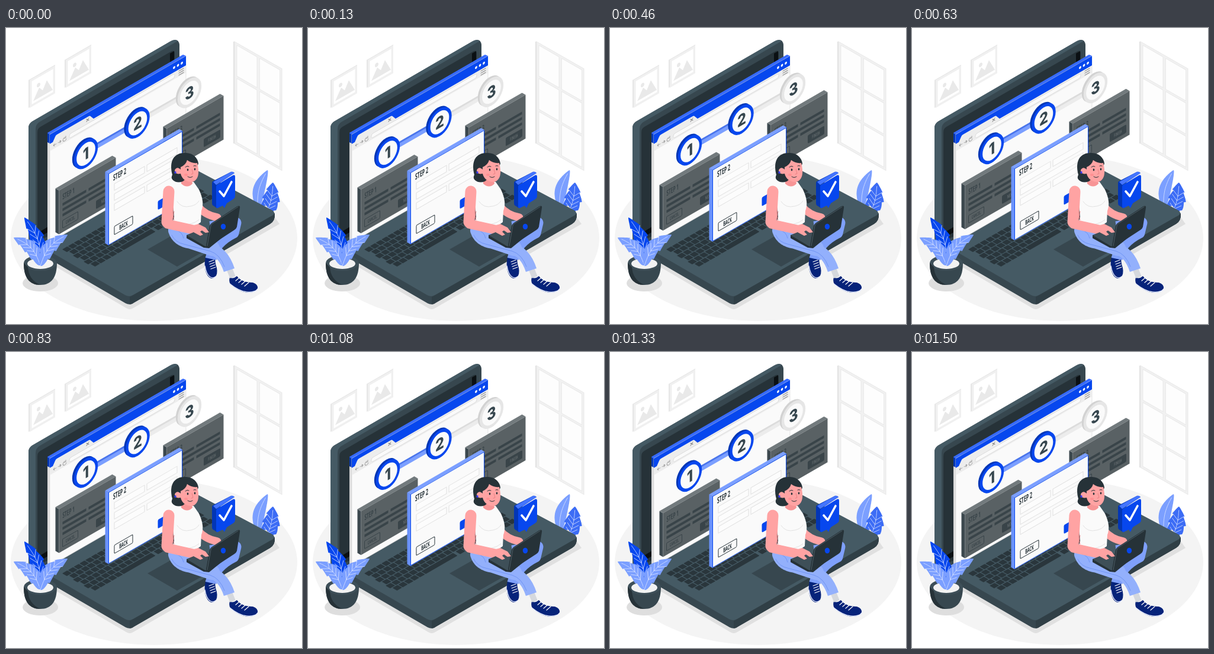
Animation of 500 by 500 pixels, one loop 1.54 s. Source, as an HTML page:

```html
<!DOCTYPE html>
<html lang="en">
<head>
<meta charset="utf-8">
<title>Step form</title>
<style>
html, body { margin: 0; width: 100%; height: 100%; overflow: hidden; background: #fff; }
svg { display: block; width: 100vw; height: 100vh; }
text { font-family: "Open Sans", sans-serif; font-weight: 700; }
.digit { font: 800 27px Inter, sans-serif; text-anchor: middle; fill: #37474f; }
</style>
</head>
<body>
<svg id="stage" viewBox="0 0 500 500"></svg>
<script>
const BLUE = '#0747ee', DEEP = '#0336b5', LIGHT = '#7b9fff', NAVY = '#06237a';
const INK = '#263238', SLATE = '#37474f', DECK = '#455a64', SKIN = '#ffa3a3', PAPER = '#fafafa';
const SLOPE = .577;

const path = (d, fill) => `<path d="${d}" fill="${fill}"/>`;
const line = (d, stroke, width = 1, cap = 'round') =>
  `<path d="${d}" fill="none" stroke="${stroke}" stroke-width="${width}" stroke-linecap="${cap}" stroke-linejoin="round"/>`;
const rect = (x, y, w, h, fill, extra = '') =>
  `<rect x="${x}" y="${y}" width="${w}" height="${h}" fill="${fill}" ${extra}/>`;
const oval = (x, y, rx, ry, fill) => `<ellipse cx="${x}" cy="${y}" rx="${rx}" ry="${ry}" fill="${fill}"/>`;
const repeat = (n, draw) => Array.from({ length: n }, (_, i) => draw(i)).join('');

// Vertical isometric plane; a positive slope rises to the right
const wall = (x, y, content, slope = SLOPE) => `<g transform="matrix(1 ${-slope} 0 1 ${x} ${y})">${content}</g>`;
const label = (x, y, size, fill, text, anchor = 'start') =>
  `<text transform="translate(${x} ${y}) scale(.5 1)" font-size="${size}" fill="${fill}" text-anchor="${anchor}">${text}</text>`;
const button = (x, y, w, h, fill, ink, size, text) =>
  rect(x, y, w, h, fill, `rx="1.5" stroke="${fill === 'none' ? ink : fill}"`) +
  label(x + w / 2, y + h / 2 + size * .36, size, ink, text, 'middle');

function slab(x, y, w, h, depth, [front, side, top], content) {
  const rise = w * SLOPE, dy = depth * SLOPE;
  return path(`M${x} ${y}l${-depth} ${-dy}v${h}l${depth} ${dy}z`, side) +
    path(`M${x} ${y}l${-depth} ${-dy}l${w} ${-rise}l${depth} ${dy}z`, top) +
    wall(x, y, rect(0, 0, w, h, front) + content);
}

// Three form rows: split, full, split
function formRows(x, y, width, step, cell) {
  const half = width / 2 - 2;
  return repeat(3, i => i === 1 ? cell(x, y + step, width)
    : cell(x, y + i * step, half) + cell(x + half + 4, y + i * step, half));
}

function leaf(x0, y0, x1, y1, width, bend, fill, teeth) {
  const dx = x1 - x0, dy = y1 - y0, len = Math.hypot(dx, dy);
  const at = (t, side) => {
    const off = bend * Math.sin(Math.PI * t) + side;
    return `${(x0 + dx * t - dy / len * off).toFixed(1)} ${(y0 + dy * t + dx / len * off).toFixed(1)}`;
  };
  const half = t => width * Math.sin(Math.PI * t ** .9) ** .75 * (1 - (teeth ? .25 : 0) * (t * teeth % 1));
  const steps = Array.from({ length: 49 }, (_, i) => i / 48.01);
  const outline = [...steps.map(t => at(t, half(t))), ...steps.reverse().map(t => at(t, -half(t)))];
  const rib = steps.filter(t => t < .9).map(t => at(t, 0));
  const veins = repeat(teeth, i => {
    const t = .25 + i * .5 / teeth;
    return [-1, 1].map(s => `M${at(t, 0)}L${at(t + .14, s * width * .6)}`).join('');
  });
  return path('M' + outline.join('L') + 'z', fill) + line('M' + rib.join('L') + veins, '#dce5ff', .8);
}

function picture(x, y) {
  return wall(x - 2, y, rect(0, 0, 45, 47, '#e6e6e6')) + wall(x, y,
    rect(0, 0, 43, 47, '#f0f0f0') + rect(3.5, 4, 36, 39, '#fff') +
    path('M6 39L16 22l6 8 7 -13 10 22z', '#e9e9e9') + oval(15, 17, 3, 3.5, '#e9e9e9'));
}

function windowFrame() {
  const pane = i => rect(4 + i % 2 * 38.5, 4 + (i >> 1) * 56, 34, 52, '#fdfdfd', 'stroke="#e6e6e6" stroke-width=".8"');
  return rect(384, 23, 3, 172, '#e2e2e2') +
    wall(386, 23, rect(0, 0, 80, 172, '#f1f1f1', 'stroke="#e8e8e8"') + repeat(6, pane), -.572);
}

function keyboard() {
  const row = j => repeat(21, i => j === 5 && i > 4 && i < 11 ? ''
    : rect(i * 11.2 + j % 2 * 3, j * 10.4, 9.8, 9, '#2a363c', 'rx="1"'));
  return `<g transform="matrix(.866 -.5 .866 .5 95 374)">${repeat(6, row)}${rect(59, 52, 62, 9, '#2a363c', 'rx="1"')}</g>`;
}

function laptop() {
  return path('M58 388L203 473Q209 477 215 473L462 331 440 300z', '#e0e0e0') +
    path('M38 169Q38 162 44 158L277 23Q291 15 293 28V232L75 375 38 358z', SLATE) +
    path('M38 169Q38 162 44 158L277 23Q284 18 290 22L56 159Q50 163 50 171V362L38 358z', DECK) +
    path('M53 176Q53 170 58 167L280 39Q285 37 285 43V225L75 350 53 360z', INK) +
    path('M277 43l7 -4v17l-7 4zM54 346l18 -11v9l-18 11z', '#0b1013') +
    path('M66 372V386L202 465Q209 469 216 464L446 331Q455 326 454 313L300 240z', SLATE) +
    path('M70 375Q63 370 70 365L303 230 446 306Q460 312 446 319L215 451Q208 455 201 451z', DECK) +
    path('M209 454v13q4 0 7 -3L446 331q9 -5 8 -18 0 3 -8 6L215 451z', '#303f46') +
    keyboard() + path('M239 374l44 -25 50 29 -44 25z', SLATE);
}

function browser() {
  return path('M74 180l-4 -3v184l4 2z', '#dcdcdc') + path('M74 180l-4 -3v16l4 2z', DEEP) +
    path('M74 180l-4 -3L299 45l5 2z', '#376bff') +
    wall(74, 180,
      rect(0, 0, 230, 182, PAPER, 'stroke="#dedede" stroke-width=".8"') +
      rect(0, 0, 230, 16, BLUE) +
      path('M0 16h5l4 -7q1 -2 3 -2h53q3 0 4 2l5 7h156v12H0z', '#ededed') +
      rect(33, 18.5, 178, 7, PAPER, 'rx="3" stroke="#d6d6d6" stroke-width=".7"') +
      line('M11 22H6l2 -2M6 22l2 2M14 22h5l-2 -2M19 22l-2 2M27 20a3 3 0 1 0 1 3M27 18v3h-3', '#929292', .8) +
      line('M62 10l4 4M66 10l-4 4' + repeat(3, i => `M218 ${18.5 + i * 3.5}h8`), '#858585', 1.1) +
      repeat(3, i => oval(210 + i * 6.5, 8, 1.9, 2.1, '#fff')));
}

const connector = (x, y, front, edge) =>
  line(`M${x - 1} ${y - 2}l54 -31`, edge, 7) + line(`M${x} ${y}l54 -31`, front, 6);

function step(n, ring, edge) {
  const x = 47.5 + 87.5 * n, y = 264 - 51.5 * n;
  const disc = (dx, fill, stroke) =>
    `<circle r="20.8" transform="matrix(.866 -.5 0 1 ${x + dx} ${y + dx * SLOPE})" fill="${fill}" stroke="${stroke}" stroke-width="5"/>`;
  return disc(-3, edge, edge) + disc(0, PAPER, ring) +
    `<text class="digit" transform="matrix(.866 -.5 0 1 ${x} ${y + 9.5})">${n}</text>`;
}

function dimCard(x, y, n, back, next) {
  const dark = '#394449', front = '#596164';
  return slab(x, y, 96, 74, 6, [front, '#3c484e', '#727a7d'],
    label(6, 19, 13, dark, 'STEP ' + n) +
    formRows(6, 25, 84, 9, (bx, by, w) => rect(bx, by, w, 4.5, dark)) +
    button(6, 54, 26, 13, 'none', dark, 8, back) + button(63, 54, 27, 13, dark, '#626a6d', 8, next));
}

function mainCard() {
  return slab(173, 246, 125, 121, 5.5, [PAPER, '#6a92fb', LIGHT],
    rect(.5, .5, 124, 120, 'none', `stroke="${BLUE}"`) +
    label(8, 17, 14, INK, 'STEP 2') +
    formRows(10, 23, 106, 17, (x, y, w) => rect(x, y, w, 11, '#fcfcfc', 'stroke="#dedede" stroke-width=".9"')) +
    button(10, 95, 31, 14, 'none', INK, 11, 'BACK') + button(84, 95, 32, 14, BLUE, '#fff', 11, 'NEXT'));
}

function pottedPlant() {
  return oval(58, 431, 30, 14, '#dedede') +
    path('M30 397C30 421 39 434 58 434S86 421 86 397z', SLATE) + oval(58, 397, 28, 13, '#3e4f58') +
    oval(58, 398, 22, 9, '#f2f2f2') + path('M30 397C30 421 39 434 58 434 43 427 38 417 37 404z', INK) +
    leaf(60, 398, 31, 320, 13, 8, BLUE, 4) +
    leaf(58, 401, 13, 354, 13, 9, LIGHT, 4) + leaf(58, 402, 104, 349, 13, -9, LIGHT, 4);
}

const floorPlant = () => leaf(425, 306, 442, 240, 10, -6, LIGHT, 0) + leaf(436, 320, 451, 261, 16, 4, '#3c6cf5', 4);

function bubble() {
  return path('M348 262q0 -3 3 -4l29 -15q3 -1 6 2l-30 20v39l-6 -4q-2 -1 -2 -4z', DEEP) +
    path('M350 260l30 -17q3 -1 6 2l-31 20z', '#4475ff') +
    path('M355 268q0 -3 3 -4l25 -15q4 -2 4 2v33q0 3 -3 5l-11 7 -4 8 -3 -4 -8 4q-3 1 -3 -2z', BLUE) +
    line('M361 276l7 8 13 -24', '#fff', 3.6);
}

function shoes() {
  return path('M337 387h16q0 10 3 18 2 11 -3 16 -6 5 -12 -2 -8 -12 -4 -32z', NAVY) +
    path('M378 421q5 4 12 -2 8 11 27 11 9 3 8 10 -4 8 -18 7 -14 -2 -28 -14 -3 -6 -1 -12z', NAVY) +
    line('M336 402q2 13 8 18 6 4 10 0M378 432q16 13 29 14 14 1 18 -5', '#e8edff', 1.5) +
    line(repeat(4, i => `M${343 + i} ${395 + i * 4}l8 -3M${388 + i * 5} ${427 + i * 3}l7 -6`), '#fff', 1.2) +
    line('M377 406l6 15', '#d5d8dd', 10, 'butt');
}

function woman() {
  const legs = line('M345 336L388 329 384 346Q352 362 346 390', '#7fa0fb', 19, 'butt') +
    line('M287 342Q292 357 312 360L348 372', '#93b0fc', 26) +
    line('M344 373Q367 378 377 409', '#93b0fc', 19, 'butt') +
    line('M280 350q6 12 20 15l45 12q16 5 24 26M286 341q12 3 14 14', '#6d91f2', .9);
  const torso = line('M324 301Q336 316 357 320', SKIN, 13) +
    path('M279 267L297 260H317L326 273Q336 294 330 309L329 328Q310 344 284 340 279 333 284 319z', PAPER) +
    path('M296 249V263q10 9 19 0l-2 -10z', '#f79596') +
    line('M289 293q8 12 23 8 10 -2 14 -9M294 331q18 4 32 -7', '#e2e2e2') +
    line('M275 276L272 328', SKIN, 19) + line('M273 331L318 341', SKIN, 16) +
    line('M284 324q-3 -6 0 -14', '#e98186');
  const head =
    path('M281 248C275 224 284 211 302 211 315 210 324 219 325 229L321 239 299 259Q289 263 282 257 278 253 281 248z', INK) +
    path('M295 235Q304 231 306 223 313 229 323 228C327 244 326 256 315 260 305 261 297 255 295 246Q285 248 285 240 289 233 295 239z', SKIN) +
    oval(286, 244, 1.7, 2, '#3d3df0') + oval(304, 248, 3, 2, '#ff9193') +
    oval(307, 239.5, 1.3, 1.9, INK) + oval(319, 238.5, 1.2, 1.9, INK) +
    line('M303 235q3 -3 6 -1M317 233q2 -1 4 0M307 251q4 3 8 0', INK) + line('M314 239l2 7 -3 1', '#e77d80', .9);
  const notebook = path('M305 350L332 339 374 347 343 372 334 371 305 355z', INK) +
    path('M305 350L332 339 374 347 337 369z', '#3e4f58') +
    path('M338 367L344 334Q345 331 348 329L391 301Q396 299 395 304L390 336Q389 339 386 341L343 369Q338 372 338 367z', INK) +
    line('M340 368L346 334Q346 332 349 330L392 302', '#51616a', .9) + oval(367, 335.5, 4.2, 4.8, BLUE);
  const hands = path('M310 335l15 -4 12 6 6 8 -6 1 -6 -4 -3 2 5 5 -5 2 -13 -7z', SKIN);
  return shoes() + legs + torso + head + notebook + hands;
}

const GREY = ['#e6e6e6', '#d2d2d2'];
const still = oval(250, 355, 242, 140, '#f4f4f4') + windowFrame() + picture(40, 88) + picture(101, 54) +
  floorPlant() + laptop() + browser();
const cards = connector(151, 202, LIGHT, '#4a75ec') + connector(239, 150.5, '#ececec', '#dcdcdc') +
  step(1, BLUE, DEEP) + step(2, BLUE, DEEP) + step(3, ...GREY) +
  dimCard(271.5, 170, 3, 'BACK', 'FINISH') + dimCard(89.5, 274.5, 1, 'CANCEL', 'NEXT') + mainCard();

const stage = document.getElementById('stage');
stage.innerHTML = `${still}<g id="floating">${cards}</g>${pottedPlant()}${bubble()}${woman()}`;
const floating = document.getElementById('floating');

function draw() {
  const t = performance.now() % 1540;
  const lift = 10 * Math.max(0, 1 - Math.abs(t / 750 - 1));
  floating.setAttribute('transform', `translate(0 ${-lift})`);
  requestAnimationFrame(draw);
}
draw();
</script>
</body>
</html>
```
